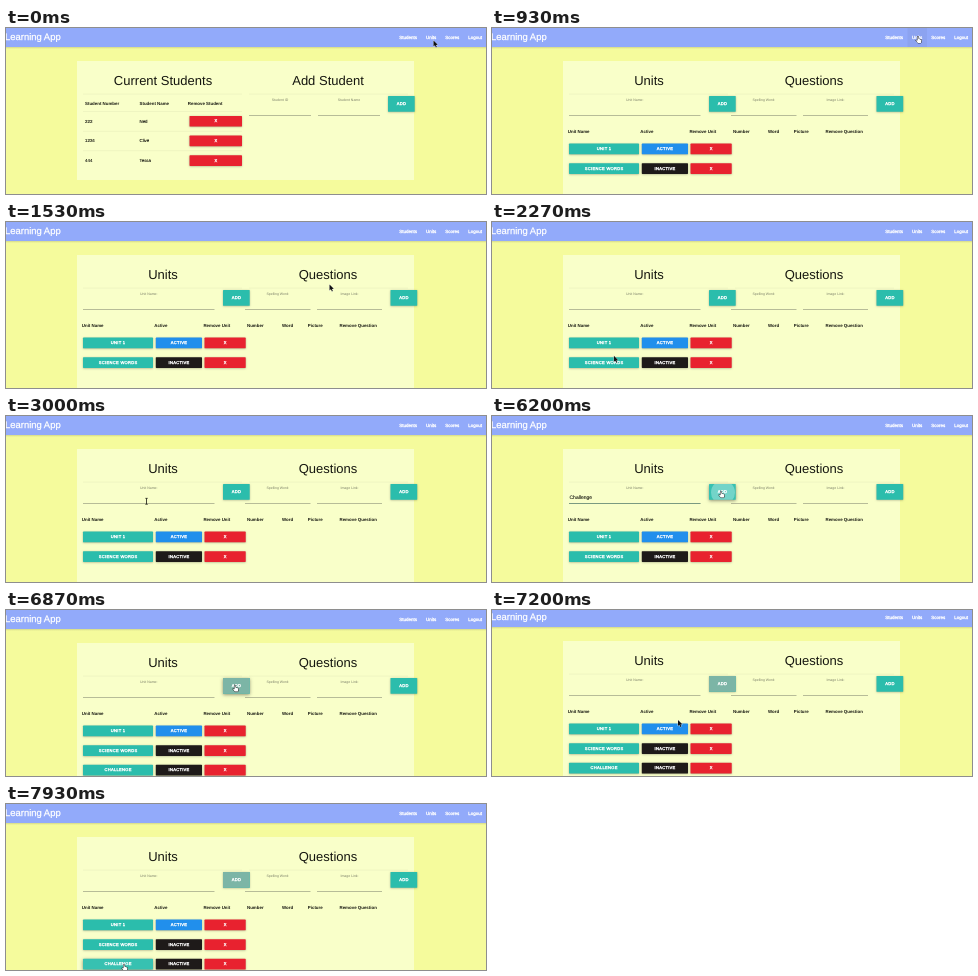
Animation, 480 px wide and 166 px high, one loop 8 s. Source, as an HTML page with a canvas:

```html
<!DOCTYPE html>
<html lang="en">
<head>
<meta charset="utf-8">
<title>Learning App</title>
<style>
html, body { margin: 0; width: 100%; height: 100%; overflow: hidden; background: #f5fb9c; }
canvas { display: block; width: 480px; height: 166px; }
</style>
</head>
<body>
<canvas id="stage"></canvas>
<script>
const W = 480, H = 166, LOOP = 8000;
const canvas = document.getElementById('stage');
const ctx = canvas.getContext('2d');
const dpr = window.devicePixelRatio || 1;
canvas.width = W * dpr;
canvas.height = H * dpr;

const TEAL = '#2bbdac', RED = '#e8222f', BLUE = '#218fec', BLACK = '#1e1a19';
const INK = '#15160f', LABEL = '#7d806a', WHITE = '#fff';

const PAGE_SWAP = 930, FOCUS = 3270, TYPE = 4200, BLUR = 6070, ADDED = 6470;
const WORD = 'Challenge';

const clamp = v => Math.max(0, Math.min(1, v));
const ramp = (t, a, b) => clamp((t - a) / (b - a));
const ease = v => v * v * (3 - 2 * v);
const mix = (a, b, k) => a + (b - a) * k;

// key points: time, x, y of the pointer tip
const PATH = [
  [0, 427.5, 12.5], [400, 425.5, 8.5], [1070, 425.5, 8.5], [1530, 323.5, 62.5],
  [1800, 186, 107], [2200, 124, 137], [2600, 112, 119], [3000, 140.5, 85],
  [5270, 140.5, 85], [5730, 228.5, 75.2], [6870, 228.5, 75.2],
  [7200, 186, 110], [7670, 117.5, 160.3], [LOOP, 117.5, 160.3]
];
let px, py, overLink;

function movePointer(t) {
  const i = PATH.findIndex(p => p[0] > t);
  const [t0, x0, y0] = PATH[i - 1], [t1, x1, y1] = PATH[i];
  const k = ramp(t, t0, t1);
  px = mix(x0, x1, k);
  py = mix(y0, y1, k);
  overLink = false;
}

// 0 outside the box, rising to 1 a little way inside it
function hoverOf(x, y, w, h) {
  const inset = Math.min(px - x, x + w - px, py - y, y + h - py);
  if (inset > 0) overLink = true;
  return clamp(inset / 3);
}

function rect(x, y, w, h, color) {
  ctx.fillStyle = color;
  ctx.fillRect(x, y, w, h);
}

// y is the vertical middle of the capitals, weight thickens the strokes
function text(s, x, y, size, { color = INK, align = 'left', bold = false, spacing = 0, weight = 0 } = {}) {
  ctx.font = `${bold ? 'bold ' : ''}${size}px "Liberation Sans", Arial, sans-serif`;
  ctx.letterSpacing = spacing + 'px';
  ctx.textAlign = align;
  ctx.fillStyle = ctx.strokeStyle = color;
  const left = x + (align === 'center' ? spacing / 2 : 0), base = y + size * 0.36;
  ctx.fillText(s, left, base);
  if (weight) {
    ctx.lineWidth = weight;
    ctx.strokeText(s, left, base);
  }
  const width = ctx.measureText(s).width;
  ctx.letterSpacing = '0px';
  return width;
}

function button(label, x, y, w, h, color, overlay) {
  const hover = hoverOf(x, y, w, h);
  ctx.save();
  ctx.shadowColor = `rgba(0,0,0,${0.3 + hover * 0.15})`;
  ctx.shadowBlur = (2 + hover * 1.5) * dpr;
  ctx.shadowOffsetY = (0.5 + hover * 0.5) * dpr;
  ctx.fillStyle = color;
  ctx.beginPath();
  ctx.roundRect(x, y, w, h, 0.6);
  ctx.fill();
  ctx.restore();
  rect(x, y, w, h, `rgba(255,255,255,${hover * 0.06})`);
  if (overlay) {
    ctx.save();
    ctx.beginPath();
    ctx.rect(x, y, w, h);
    ctx.clip();
    overlay();
    ctx.restore();
  }
  text(label, x + w / 2, y + h / 2 - 0.2, 4.1, { color: WHITE, align: 'center', spacing: 0.28, weight: 0.32 });
}

const addButton = (x, overlay) => button('ADD', x, 68, 26.7, 15.8, TEAL, overlay);
const title = (s, x) => text(s, x, 52.2, 13, { align: 'center' });
const rule = (x, y, w) => rect(x, y, w, 0.5, 'rgba(60,60,40,.1)');
const head = (s, x, y) => text(s, x, y, 4.4, { bold: true });

function field(label, x, w) {
  text(label, x + w / 2, 71.5, 3.5, { color: LABEL, align: 'center' });
  rect(x, 87.1, w, 0.6, '#8b8f78');
}

function card(bottom, left, right) {
  rect(71, 33, 337, bottom - 33, '#f9ffc9');
  title(left, 157);
  title(right, 322);
  rule(77, 65.8, 159);
  rule(243, 65.8, 159);
}

function navBar() {
  rect(0, 0, W, H + 4, '#f5fb9c');
  const shade = ctx.createLinearGradient(0, 19, 0, 21);
  shade.addColorStop(0, 'rgba(60,60,60,.18)');
  shade.addColorStop(1, 'rgba(60,60,60,0)');
  rect(0, 19, W, 2, shade);
  rect(0, 0, W, 19, '#92aafa');
  rect(415.5, 0, 19.5, 19, `rgba(0,0,0,${hoverOf(415.5, -3, 19.5, 15) * 0.04})`);
  text('Learning App', -1, 8.9, 9.45, { color: WHITE, weight: 0.25 });
  let right = 476;
  for (const s of ['Logout', 'Scores', 'Units', 'Students'])
    right -= text(s, right, 9, 4.5, { color: WHITE, align: 'right', weight: 0.3 }) + 9;
}

function studentsPage() {
  card(152, 'Current Students', 'Add Student');
  head('Student Number', 79, 75.2);
  head('Student Name', 133.5, 75.2);
  head('Remove Student', 181.8, 75.2);
  [['222', 'Ned'], ['1234', 'Clive'], ['444', 'Tessa']].forEach(([id, name], i) => {
    const y = 93.2 + i * 19.7;
    rule(77, y - 10, 159);
    text(id, 79, y, 4.4, { weight: 0.12 });
    text(name, 133.5, y, 4.4, { weight: 0.12 });
    button('X', 183.5, y - 5.3, 52.5, 10.6, RED);
  });
  field('Student ID', 243, 62);
  field('Student Name', 312, 62);
  addButton(382);
}

// typing starts with one letter, pauses, then slows towards the end
const keyTime = i => i ? 4440 + 8.6 * (i - 1) ** 2 : TYPE;

function unitField(t) {
  field('Unit Name:', 77, 131.5);
  if (t >= ADDED) return;
  const focus = ramp(t, FOCUS, FOCUS + 130) * (1 - 0.5 * ramp(t, BLUR, BLUR + 130));
  rect(77, 87, 131.5, 0.8, `rgba(32,104,96,${focus})`);
  const typed = [...WORD].filter((_, i) => t >= keyTime(i)).join('');
  const width = text(typed, 77.5, 81.1, 5, { weight: 0.1 });
  const blinkOn = (t - FOCUS) % 1000 < 500;
  const typing = t > TYPE - 130 && t < 5370;
  if (t >= FOCUS && t < BLUR && (typing || blinkOn)) rect(77.7 + width, 78, 0.7, 6, INK);
}

function ripple(t) {
  if (t < BLUR) return;
  const fade = ramp(t, ADDED, 6730);
  ctx.fillStyle = `rgba(255,255,255,${0.3 * (1 - fade)})`;
  ctx.beginPath();
  ctx.arc(231, 76.5, mix(4, 12, ramp(t, BLUR, 6200)) + 12 * fade, 0, 7);
  ctx.fill();
  rect(217, 68, 27, 16, `rgba(124,181,166,${fade})`);
}

function unitsPage(t) {
  card(H + 4, 'Units', 'Questions');
  unitField(t);
  addButton(217, () => ripple(t));
  field('Spelling Word:', 239, 65.5);
  field('Image Link:', 311, 65);
  addButton(384.5);

  const heads = { 'Unit Name': 75.8, Active: 148.3, 'Remove Unit': 197.4, Number: 241,
    Word: 276, Picture: 301.8, 'Remove Question': 333.5 };
  for (const s in heads) head(s, heads[s], 103.6);

  const units = ['UNIT 1', 'SCIENCE WORDS'];
  if (t >= ADDED) units.push('CHALLENGE');
  units.forEach((name, i) => {
    const y = 115.6 + i * 19.6;
    button(name, 77, y, 70, 10.7, TEAL);
    button(i ? 'INACTIVE' : 'ACTIVE', 149.8, y, 46.2, 10.7, i ? BLACK : BLUE);
    button('X', 198.5, y, 41.2, 10.7, RED);
  });
}

function outline(points, fill, line) {
  ctx.beginPath();
  points.forEach(([x, y]) => ctx.lineTo(x, y));
  ctx.closePath();
  ctx.lineWidth = 0.9;
  ctx.lineJoin = 'round';
  ctx.strokeStyle = line;
  ctx.stroke();
  ctx.fillStyle = fill;
  ctx.fill();
}

const ARROW = [[0, 0], [0, 6], [1.4, 4.8], [2.4, 7], [3.4, 6.6], [2.4, 4.4], [4.3, 4.3]];
const HAND = [[0, 0], [0.9, 0], [1, 2.3], [4, 3.4], [3.4, 6.4], [0.3, 6.4], [-1.7, 3.7], [0, 4]];

function pointer(t, scroll) {
  if (t > TYPE - 70 && t < 5270) return;
  const overField = t > PAGE_SWAP && px > 77 && px < 208 && py > 76 && py < 88 - scroll;
  ctx.save();
  ctx.translate(px, py);
  if (overField) {
    rect(-0.35, -2.8, 0.8, 6, INK);
    rect(-1.3, -3.1, 2.7, 0.6, INK);
    rect(-1.3, 2.9, 2.7, 0.6, INK);
  } else if (overLink) {
    outline(HAND, WHITE, '#111');
  } else {
    outline(ARROW, '#111', 'rgba(255,255,255,.6)');
  }
  ctx.restore();
}

function draw(t) {
  ctx.setTransform(dpr, 0, 0, dpr, 0, 0);
  ctx.textRendering = 'geometricPrecision';
  movePointer(t);
  const scroll = 2 * ease(ramp(t, 6900, 7070)) * (1 - ease(ramp(t, 7330, 7530)));
  ctx.save();
  ctx.translate(0, -scroll);
  navBar();
  if (t < PAGE_SWAP) studentsPage();
  else unitsPage(t);
  ctx.restore();
  pointer(t, scroll);
}

let start;
function tick(now) {
  start ??= now;
  draw((now - start) % LOOP);
  requestAnimationFrame(tick);
}
draw(0);
requestAnimationFrame(tick);
</script>
</body>
</html>
```
